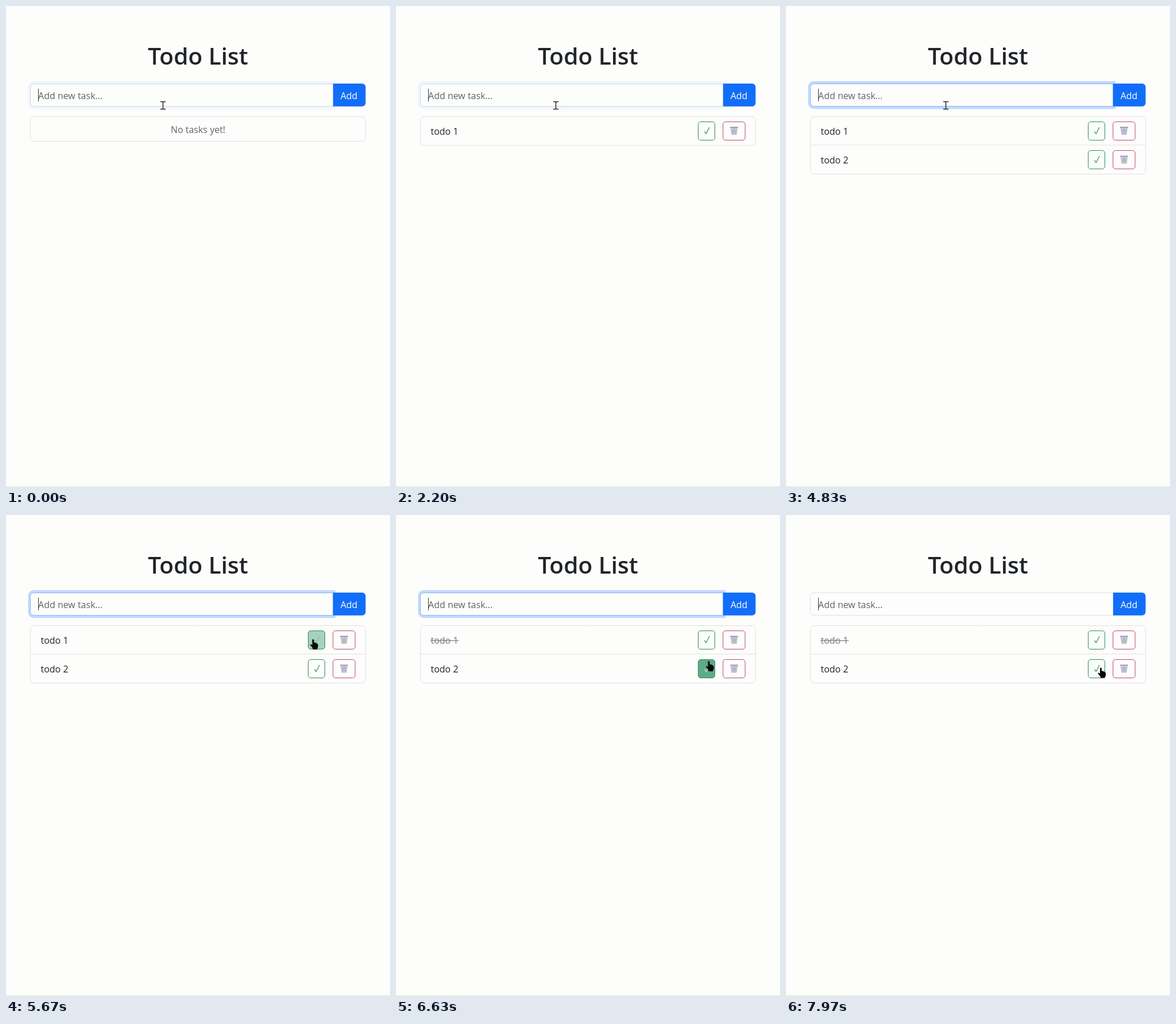
Write an HTML page with a canvas that moves like this. It is 669 px wide and 837 px high and loops after 8000 ms.

```html
<!DOCTYPE html>
<html lang="en">
<head>
<meta charset="utf-8">
<title>Todo List</title>
<style>
  html, body { margin: 0; width: 100%; height: 100%; overflow: hidden; background: #fdfdfc; }
  canvas { display: block; }
</style>
</head>
<body>
<canvas id="stage" width="669" height="837"></canvas>
<script>
const ctx = document.getElementById('stage').getContext('2d');
const LOOP = 8000, FADE = 150, BLINK = 530, KEY_GAP = 175, ROW = 50.2;
const FONT = '"Open Sans", "Noto Sans", sans-serif';
const BG = '#fdfdfc', INK = '#212529', MUTED = '#606366', DONE = '#797c7e';
const BLUE = '#126ef8', LINE = '#dfe1e4', RED = '#b64a72';
const PAPER = [253, 253, 252], GREEN = [40, 142, 94], WHITE = [255, 255, 255];
const BORDER = [222, 226, 230], FOCUS = [134, 183, 254];

// Every submit or toggle reloads the page.
const loads = [
  { at: -45, tasks: [] },
  { at: 2155, tasks: ['open'] },
  { at: 4450, tasks: ['open', 'open'] },
  { at: 6130, tasks: ['done', 'open'] },
  { at: 6950, tasks: ['done', 'done'] },
  { at: 7962, tasks: ['done', 'open'] }
];
const entries = [
  { text: 'todo 1', at: 620 },
  { text: 'todo 2', at: 2960 }
];
const moves = [
  { from: 1300, to: 1480, x: 278, y: 173 },
  { from: 4880, to: 5400, x: 478, y: 281 },
  { from: 5490, to: 5650, x: 535, y: 217 },
  { from: 6250, to: 6600, x: 545, y: 255 },
  { from: 6700, to: 6800, x: 547, y: 264 },
  { from: 6990, to: 7340, x: 574, y: 338 },
  { from: 7560, to: 7910, x: 548.5, y: 266.5 }
];

const clamp = v => Math.max(0, Math.min(1, v));
const ease = v => { v = clamp(v); return v * v * (3 - 2 * v); };
const mix = (a, b, k) => `rgb(${a.map((v, i) => Math.round(v + (b[i] - v) * k))})`;

function text(str, x, y, color, size = 16, align = 'left', weight = 400) {
  ctx.font = `${weight} ${size}px ${FONT}`;
  ctx.textAlign = align;
  ctx.fillStyle = color;
  ctx.fillText(str, x, y);
}

function rect(x, y, w, h, color) {
  ctx.fillStyle = color;
  ctx.fillRect(x, y, w, h);
}

function box(x, y, w, h, r, stroke, fill) {
  ctx.beginPath();
  ctx.roundRect(x, y, w, h, r);
  if (fill) { ctx.fillStyle = fill; ctx.fill(); }
  if (stroke) { ctx.strokeStyle = stroke; ctx.lineWidth = 1; ctx.stroke(); }
}

function shape(d, x, y, fill, stroke, width = 1) {
  const p = new Path2D(d);
  ctx.save();
  ctx.translate(x, y);
  ctx.lineJoin = ctx.lineCap = 'round';
  if (stroke) { ctx.strokeStyle = stroke; ctx.lineWidth = width; ctx.stroke(p); }
  if (fill) { ctx.fillStyle = fill; ctx.fill(p); }
  ctx.restore();
}

function pointerAt(t) {
  let x = 273, y = 173;
  for (const m of moves) {
    const k = ease((t - m.from) / (m.to - m.from));
    x += (m.x - x) * k;
    y += (m.y - y) * k;
  }
  return { x, y };
}

const overCheck = ({ x, y }, row) =>
  x > 526 && x < 556 && y > 201 + row * ROW && y < 234 + row * ROW;

// Share of the last fade period that the pointer spent on the button.
function hoverLevel(t, row, since) {
  const steps = 30;
  let hits = 0;
  for (let i = 0; i < steps; i++) {
    const past = t - i * FADE / steps;
    if (past >= since && overCheck(pointerAt(past), row)) hits++;
  }
  return ease(hits / steps);
}

function typedAt(t, load) {
  const entry = entries.filter(e => e.at <= t && e.at > load.at).pop();
  if (!entry) return { str: '', since: load.at };
  const n = Math.min(entry.text.length, 1 + Math.floor((t - entry.at) / KEY_GAP));
  return { str: entry.text.slice(0, n), since: entry.at + (n - 1) * KEY_GAP };
}

function drawInput(t, load) {
  const focus = ease((t - load.at) / FADE);
  box(569, 135, 57.5, 39.7, [0, 6, 6, 0], null, BLUE);
  text('Add', 597.5, 162, '#fff', 16, 'center');

  ctx.beginPath();
  ctx.roundRect(38.5, 130.8, 535.5, 48.4, [10, 0, 0, 10]);
  ctx.roundRect(42.5, 135, 527.5, 40, [6, 0, 0, 6]);
  ctx.fillStyle = `rgba(13,110,253,${0.25 * focus})`;
  ctx.fill('evenodd');
  box(42.5, 135.5, 527, 39, [6, 0, 0, 6], mix(BORDER, FOCUS, focus), BG);

  const { str, since } = typedAt(t, load);
  text(str || 'Add new task...', 56, 162, str ? INK : MUTED);
  if ((t - since) % (2 * BLINK) < BLINK) {
    rect(Math.round(56 + (str ? ctx.measureText(str).width : 0)), 144, 1, 22, '#333');
  }
}

function drawTrash(x, y) {
  shape('M-6.5 -6H6.5L4.6 7H-4.6Z', x, y, '#cbc9d6');
  shape('M-5 -3L3 6.5M-1 -4L4 4M5 -3L-3 6.5M1 -4L-4 4', x, y, null, '#a09bb5', 0.8);
  shape('M-6.4 -6.2H6.4', x, y, null, '#9893a9', 1.6);
}

function drawRow(row, state, glow) {
  const mid = 217.3 + row * ROW, base = 224 + row * 50, top = 201.5 + row * 50;
  const label = `todo ${row + 1}`, done = state === 'done';
  if (row) rect(43, 241.5, 583, 1, LINE);
  text(label, 60.5, base, done ? DONE : INK);
  if (done) rect(60, base - 6, ctx.measureText(label).width + 1, 1.2, DONE);
  box(526.5, top, 29, 32, 4.5, mix(GREEN, GREEN, 1), mix(PAPER, GREEN, glow));
  shape('M-4 1.2L-1.5 5L4.3 -6', 541.7, mid, null, mix(GREEN, WHITE, glow), 1.2);
  box(569.7, top, 38.5, 32, 4.5, RED);
  drawTrash(589, mid);
}

function drawList(t, load) {
  const n = load.tasks.length;
  box(42.5, 192.5, 584, n ? n * ROW - 0.4 : 43, 6, LINE);
  if (!n) text('No tasks yet!', 334.5, 220.5, MUTED, 16, 'center');
  load.tasks.forEach((state, row) => drawRow(row, state, hoverLevel(t, row, load.at)));
}

function drawPointer(t, load) {
  const p = pointerAt(t);
  if (p.y < 176 && p.x < 569) {
    shape('M-4 -6.5H-1.2L0 -5.8L1.2 -6.5H4M0 -5.8V5.8M-4 6.5H-1.2L0 5.8L1.2 6.5H4',
      p.x + 0.5, p.y, null, '#2a2a2a', 1.5);
  } else if (load.tasks.some((_, row) => overCheck(p, row))) {
    shape('M-1.5 0Q0 -1.6 1.5 0V5L3 4.8L4 5.6L5.5 5.6L6.5 6.8L8 7.2L8.6 9V12L7 17H0L-1.5 13.5L-5 9.6Q-5.2 7.6 -3.4 8L-1.5 9.5Z',
      p.x, p.y, '#080808');
  } else {
    shape('M0 0V16L3.8 12.4L6.2 18L8.6 17L6.2 11.5H11.4Z', p.x, p.y, '#080808', '#fff', 1.4);
  }
}

function draw(t) {
  rect(0, 0, 669, 837, BG);
  rect(0, 836, 669, 1, '#c9f3c6');
  const load = loads.filter(l => l.at <= t).pop();
  text('Todo List', 334.5, 102, INK, 40.6, 'center', 600);
  drawInput(t, load);
  drawList(t, load);
  drawPointer(t, load);
}

const began = performance.now();
function tick() {
  draw((performance.now() - began) % LOOP);
  requestAnimationFrame(tick);
}
tick();
</script>
</body>
</html>
```
